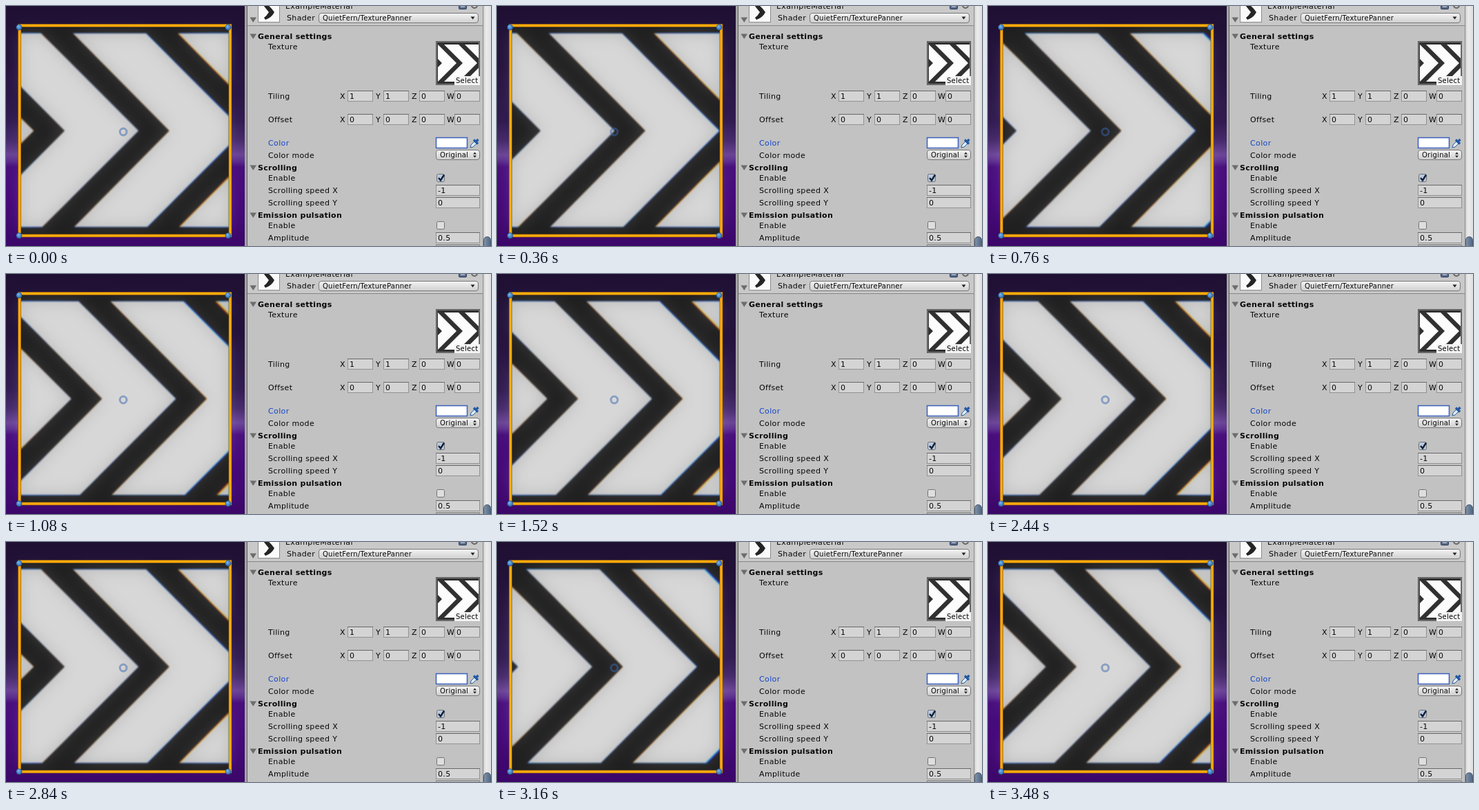
These frames come from a looping animation (703x349 px, 3640 ms). An HTML page with a canvas:

```html
<!DOCTYPE html>
<html lang="en">
<head>
<meta charset="utf-8">
<title>Texture panner</title>
<style>
  html, body { margin: 0; width: 100%; height: 100%; overflow: hidden; background: #c2c2c2; }
  canvas, svg { position: absolute; left: 0; top: 0; display: block; }
  text { font: 11px "DejaVu Sans", sans-serif; letter-spacing: .36px; fill: #060606; white-space: pre; }
  .bold { font-weight: bold; letter-spacing: .3px; }
  .small { font-size: 10px; letter-spacing: .25px; }
  .active { fill: #1546c8; }
</style>
</head>
<body>
<canvas id="scene" width="347" height="349"></canvas>
<svg id="panel" width="703" height="349" viewBox="0 0 703 349">
  <defs>
    <linearGradient id="button" x2="0" y2="1">
      <stop stop-color="#f4f4f4"/><stop offset="1" stop-color="#cfcfcf"/>
    </linearGradient>
    <linearGradient id="track">
      <stop stop-color="#c4c4c4"/><stop offset=".4" stop-color="#ececec"/><stop offset="1" stop-color="#dedede"/>
    </linearGradient>
    <linearGradient id="thumb">
      <stop stop-color="#8794a5"/><stop offset=".5" stop-color="#667d99"/><stop offset="1" stop-color="#52677f"/>
    </linearGradient>
    <clipPath id="slot"><path d="M626 56h59v54h-59z"/></clipPath>
  </defs>
</svg>
<script>
const LOOP = 3640;
const STEPS = [40, 120, 200, 360, 440, 520, 600, 760, 840, 960, 1080, 1200, 1280, 1360,
  1520, 1600, 1680, 1840, 1920, 2000, 2120, 2240, 2320, 2440, 2560, 2640, 2760, 2840,
  3000, 3080, 3160, 3320, 3400, 3480];
const QUAD = { left: 21, right: 323, top: 40, bottom: 321, period: 151.5 };
const ADVANCE = QUAD.period * 3 / 14;
const FIRST_TIP = 236.5;

// Light stripes between dark chevrons, sampled row by row and mapped through warp.
function stripePath(box, tip, warp = (x, y) => [x, y]) {
  const { left, right, top, bottom, period } = box;
  const mid = (top + bottom) / 2 + period * .006;
  const clamp = x => Math.min(right, Math.max(left, x));
  const path = new Path2D();
  const first = left - period + (((tip - left) % period) + period) % period;
  for (let x = first; x < right + bottom - mid; x += period) {
    const near = [], far = [];
    for (let y = top; y <= bottom; y++) {
      const reach = Math.abs(y - mid);
      near.push(warp(clamp(x - .985 * reach), y));
      far.push(warp(clamp(x + period * .706 - .995 * reach), y));
    }
    near.concat(far.reverse()).forEach(([px, py], i) => i ? path.lineTo(px, py) : path.moveTo(px, py));
    path.closePath();
  }
  return path;
}

// Colour fringes grow with the cube of the distance from the view centre.
const lens = amount => (x, y) => {
  const dx = x - 172, dy = y - 182, pull = amount * 5e-7 * (dx * dx + dy * dy);
  return [x + dx * pull + amount * .6, y + dy * pull * .4];
};

const ctx = document.getElementById("scene").getContext("2d");

function drawBackdrop() {
  const sky = ctx.createLinearGradient(0, 0, 0, 349);
  [[0, "#1f1033"], [.25, "#24123c"], [.48, "#311b50"], [.56, "#462a6b"], [.62, "#6a4495"],
   [.645, "#5d2f8e"], [.67, "#480f7c"], [.8, "#450879"], [1, "#3b0768"]]
    .forEach(([at, color]) => sky.addColorStop(at, color));
  ctx.fillStyle = sky;
  ctx.fillRect(0, 0, 347, 349);
}

function drawHandles() {
  [["#8a5c10", 4.6], ["#ffab0c", 3.4]].forEach(([color, width]) => {
    ctx.strokeStyle = color;
    ctx.lineWidth = width;
    ctx.strokeRect(19.6, 28.4, 305.4, 305.6);
  });
  for (const x of [19, 322]) for (const y of [31, 334]) {
    const dot = ctx.createRadialGradient(x - 1, y - 1.5, .5, x, y, 4.5);
    dot.addColorStop(0, "#79b4e8");
    dot.addColorStop(.7, "#3c7bbd");
    dot.addColorStop(1, "#1d4778");
    ctx.fillStyle = dot;
    ctx.beginPath();
    ctx.arc(x, y, 4.4, 0, 7);
    ctx.fill();
  }
  ctx.strokeStyle = "rgba(56,104,172,.5)";
  ctx.lineWidth = 3;
  ctx.beginPath();
  ctx.arc(170, 183, 4.9, 0, 7);
  ctx.stroke();
}

function drawScene(step) {
  const tip = FIRST_TIP + step * ADVANCE;
  drawBackdrop();
  ctx.fillStyle = "#201f20";
  ctx.fillRect(20, 29, 304, 305);
  ctx.globalCompositeOperation = "lighter";
  ctx.filter = "blur(.8px)";
  [["#9a0000", 0], ["#009a00", .4], ["#00009a", 1]].forEach(([color, amount]) => {
    ctx.fillStyle = color;
    ctx.fill(stripePath(QUAD, tip, lens(amount)));
  });
  ctx.filter = "blur(12px)";
  ctx.fillStyle = "#1e1e1e";
  ctx.fill(stripePath(QUAD, tip));
  ctx.filter = "none";
  ctx.globalCompositeOperation = "source-over";
  drawHandles();
}

const panel = document.getElementById("panel");
function add(tag, attrs, content = "") {
  const node = document.createElementNS(panel.namespaceURI, tag);
  for (const key in attrs) node.setAttribute(key, attrs[key]);
  node.textContent = content;
  panel.append(node);
}
const rect = (x, y, width, height, fill, more) => add("rect", { x, y, width, height, fill, ...more });
const shape = (d, fill, more) => add("path", { d, fill, ...more });
const label = (x, y, content, cls = "") => add("text", { x, y, class: cls }, content);
const foldout = y => shape(`M353.5 ${y - 3.5}h9.5l-4.75 7.5z`, "#6c6c6c");
const heading = (y, content) => { foldout(y - 4); label(365, y, content, "bold"); };
const button = (x, y, width, height) =>
  rect(x + .5, y + .5, width - 1, height - 1, "url(#button)", { rx: 3.5, stroke: "#777" });
function field(x, y, width, value) {
  rect(x + .5, y + .5, width - 1, 15, "#d4d4d4", { stroke: "#929292" });
  shape(`M${x} ${y + .5}h${width}`, "none", { stroke: "#686868" });
  label(x + 3, y + 12, value);
}
function checkbox(y, checked) {
  rect(624.5, y - 5.5, 11, 11, checked ? "#b9c9de" : "#dedede", { rx: 2, stroke: "#707070" });
  if (checked) shape(`M627 ${y}l3 3.5l5-8`, "none", { stroke: "#101f38", "stroke-width": 2.4 });
}

// The material's own texture, shown still in its preview slot.
function buildPreview() {
  rect(623.5, 51.5, 63, 63, "#777", { stroke: "#595959" });
  rect(625, 53, 60, 60, "#303030");
  for (let tip = 602; tip < 725; tip += 30)
    shape(`M${tip} 83l-27-27h21l27 27l-27 27h-21z`, "#fcfcfc", { "clip-path": "url(#slot)" });
  rect(650, 102, 37, 13, "#f4f4f4");
  label(652, 112, "Select", "small");
}

function buildPanel() {
  rect(346, 0, 357, 349, "#c2c2c2");
  rect(346, 0, 3, 349, "#a5a5a5");
  rect(349, 0, 1, 349, "#606060");
  rect(350, 0, 341, 29, "#c9c9c9");
  rect(350, 28, 341, 1, "#858585");

  rect(365.5, -5.5, 31, 29, "#fafafa", { stroke: "#8a8a8a" });
  shape("M373-1h7q5 4 9 10q-4 8-13 11l-2-3q4-3 7-8q-4-5-8-10z", "#242424");
  foldout(20);
  label(405, 4, "ExampleMaterial");
  rect(656.5, -5.5, 11, 10, "#56698c", { rx: 1, stroke: "#2d3b57" });
  shape("M659 1h6", "none", { stroke: "#dce3ef" });
  add("circle", { cx: 679, cy: -1, r: 4, fill: "none", stroke: "#666", "stroke-width": 2 });
  label(407, 21, "Shader");
  button(453, 10, 232, 15);
  label(459, 21, "QuietFern/TexturePanner", "small");
  shape("M673.5 15.5h6l-3 4z", "#222");

  heading(48, "General settings");
  label(380, 63, "Texture");
  buildPreview();
  [["Tiling", 123, 1], ["Offset", 157, 0]].forEach(([name, y, value]) => {
    label(380, y + 12, name);
    [..."XYZW"].forEach((axis, i) => {
      const x = [495, 547, 599, 650][i];
      label(x - 11, y + 12, axis);
      field(x, y, 37, i < 2 ? value : 0);
    });
  });
  label(380, 203, "Color", "active");
  rect(623.5, 191.5, 45, 15, "#fff", { stroke: "#4264bd", "stroke-width": 1.6 });
  shape("M673 206l1-4l6-6l3 3l-6 6z", "#d9edff", { stroke: "#2f5c94" });
  shape("M678 194.5l6 6M681 197.5l3.5-3.5", "none", { stroke: "#2459a5", "stroke-width": 3.4 });
  label(380, 221, "Color mode");
  button(623, 209, 64, 15);
  label(629, 220, "Original", "small");
  shape("M677 215.5h5l-2.5-3zM677 217.5h5l-2.5 3z", "#222");

  heading(239, "Scrolling");
  label(380, 254, "Enable");
  checkbox(250, true);
  label(380, 272, "Scrolling speed X");
  field(623, 260, 64, "-1");
  label(380, 290, "Scrolling speed Y");
  field(623, 278, 64, "0");

  heading(308, "Emission pulsation");
  label(380, 323, "Enable");
  checkbox(319, false);
  label(380, 341, "Amplitude");
  field(623, 329, 64, "0.5");
  field(623, 347, 64, "");

  rect(691, 0, 12, 349, "url(#track)");
  rect(691, 0, 1, 349, "#8c8c8c");
  rect(692.5, 335.5, 10, 24, "url(#thumb)", { rx: 5, stroke: "#46586e" });
}

buildPanel();

const start = performance.now();
let shown = -1;
function tick() {
  const time = (performance.now() - start) % LOOP;
  const step = STEPS.filter(at => at <= time).length;
  if (step !== shown) drawScene(shown = step);
  requestAnimationFrame(tick);
}
tick();
</script>
</body>
</html>
```
